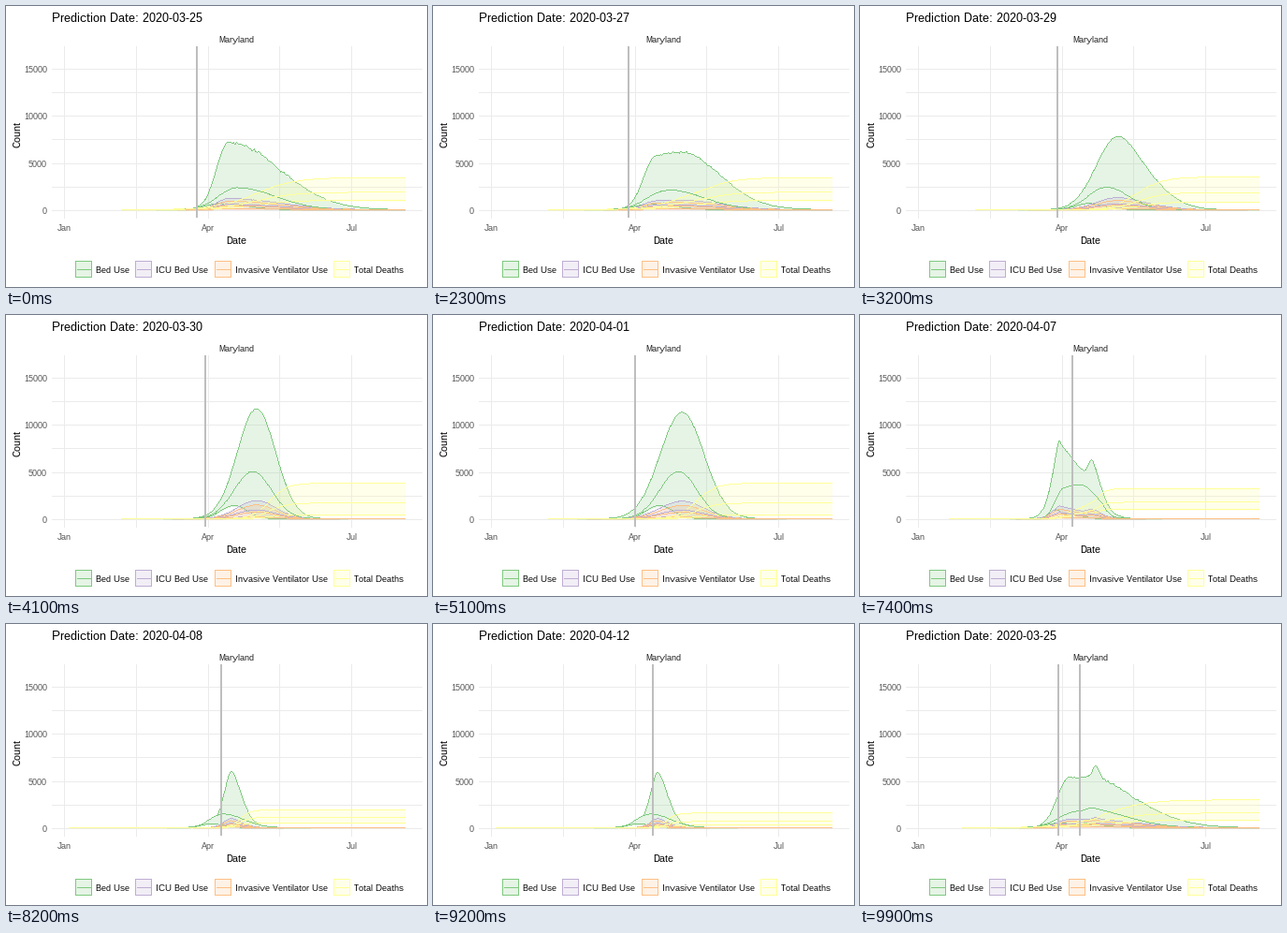
Recreate the animation shown at these times as a matplotlib script. Size 450x300 px, loop 10000 ms.

```python
import numpy as np
import matplotlib as mpl
import matplotlib.pyplot as plt
from matplotlib.animation import FuncAnimation
from matplotlib.patches import Polygon, Rectangle

W, H, DPI = 450, 300, 72
FRAMES, STEP, MOVE = 100, 100, 4
mpl.rcParams.update({
    "toolbar": "None",
    "font.family": "Liberation Sans",
    "text.hinting": "native",
    "text.hinting_factor": 1,
})

TOP, BOTTOM, LEFT, RIGHT = 43, 226, 49, 444
COLORS = ["#7FC97F", "#BEAED4", "#FDC086", "#FFFF99"]
GRID, RULE = "#EBEBEB", "#BEBEBE"
ALPHA = 0.2
LAST_DAY = 216
SHORT, LONG = 36, 3  # first day of a short and of a long record


def day_x(day):
    return 62.6 + 1.687 * day


def count_y(count):
    return 218.5 - count * 0.01009


def bump(x, h, c, left, right, p=2.0):
    """Peak of height h at c with its own width on either side."""
    return h * np.exp(-0.5 * (np.abs(x - c) / np.where(x < c, left, right)) ** p)


def rise(x, h, c, w):
    return h / (1 + np.exp(-np.clip((x - c) / w, -50, 50)))


def wobble(x, size):
    """Uneven factor around 1, one seeded value per day."""
    noise = np.random.default_rng(4).normal(0, size, LAST_DAY)
    return 1 + np.interp(x, day_x(np.arange(LAST_DAY)), noise)


class Forecast:
    def __init__(self, first, peak, mean, deaths, rough=0):
        self.first, self.peak, self.mean = first, peak, mean
        self.deaths, self.rough = deaths, rough

    def curves(self, days):
        """Upper, mean and lower curve of each of the four groups."""
        x = day_x(days)
        up = bump(x, *self.peak) * wobble(x, self.rough)
        h, c, left, right = self.mean
        mid = bump(x, *self.mean)
        low = bump(x, 0.28 * h, c - left, 0.7 * left, 0.7 * right)
        icu = [up * k for k in (0.165, 0.08, 0.02)]
        vent = [up * k for k in (0.125, 0.06, 0.015)]
        _, top, _, fall = self.peak[:4]
        dead = [rise(x, d, top + 5 + 0.45 * fall, 2 + 0.35 * fall)
                for d in self.deaths]
        return np.array([[np.maximum(up, mid), mid, np.minimum(low, mid)],
                         icu, vent, dead])


def middle(i):
    return Forecast(SHORT, (11700 - 250 * i, 268 - i, 20 + 2 * i, 20 + 2 * i),
                    (5000, 264 - i, 20, 20), (3750, 1650, 400))


def late(i):
    return Forecast(LONG, (6000 - 75 * i, 241 - i / 2, 7.6, 10.5, 1.7),
                    (1450, 232, 14, 22),
                    (2000 - 225 * i, 1250 - 300 * i, 630 - 190 * i))


early = Forecast(SHORT, (7100, 238, 13, 54), (2330, 247, 20, 41),
                 (3400, 1850, 1000), rough=0.015)
broad = Forecast(SHORT, (7000, 283, 25, 32), (1500, 262, 18, 30),
                 (3350, 1850, 950))
sharp = Forecast(SHORT, (16500, 241, 6.8, 9.5, 1.5), (6740, 247, 9.5, 9),
                 (4400, 2230, 1450))

DAYS = [84, 85, 86, 88, 89, 90, 91, 95, 97, 98, 100, 102]
MODELS = ([early] * 3 + [broad] + [middle(i) for i in range(3)]
          + [sharp] * 2 + [late(i) for i in range(3)])


def date(day):
    month, dom = (3, day - 59) if day < 91 else (4, day - 90)
    return f"2020-{month:02d}-{dom:02d}"


def phase(frame):
    """Current state, next state and progress between the two."""
    state = 0
    for i in range(len(DAYS)):
        after = (i + 1) % len(DAYS)
        step = frame - (5 + 8 * i + min(i, 4)) + 1
        if step >= MOVE:
            state = after
        elif step > 0:
            return i, after, step / MOVE
    return state, state, 0.0


def lag(days):
    """Days by which a long record trails its match in a short one."""
    return (SHORT - LONG) * np.clip((117 - days) / 10, 0, 1)


def blend(a, b, t):
    first = max(a.first, b.first)
    days = np.linspace(first, LAST_DAY, (LAST_DAY - first) * 4 + 1)
    da, db = (days - lag(days) if m.first < first else days for m in (a, b))
    ya, yb = a.curves(da), b.curves(db)
    return day_x(da + (db - da) * t), count_y(ya + (yb - ya) * t)


def pixels(x, y):
    """Whole pixels along a path, one per step of its longer direction."""
    step = np.maximum(np.abs(np.diff(x)), np.abs(np.diff(y)))
    length = np.r_[0, np.cumsum(step)]
    s = np.arange(0, length[-1], 0.95)
    return np.floor(np.interp(s, length, x)), np.floor(np.interp(s, length, y))


fig = plt.figure(figsize=(W / DPI, H / DPI), dpi=DPI, facecolor="white")
ax = fig.add_axes([0, 0, 1, 1])
ax.set_xlim(0, W)
ax.set_ylim(H, 0)
ax.axis("off")


def put(x, y, text, size=9, color="black", **kw):
    return ax.text(x, y, text, fontsize=size, color=color,
                   **{"va": "baseline", "ha": "left", **kw})


def stroke(xs, ys, color, z):
    ax.plot(xs, ys, color=color, lw=1, antialiased=False, zorder=z,
            solid_capstyle="butt", solid_joinstyle="miter")


def thin(color, z):
    return ax.plot([], [], ",", color=color, zorder=z)[0]


def area(color, z):
    return ax.add_patch(Polygon(
        np.zeros((3, 2)), closed=True, facecolor=color, edgecolor="none",
        alpha=ALPHA, antialiased=False, zorder=z))


def block(x, y, w, h, z, **kw):
    return ax.add_patch(Rectangle((x, y), w, h, antialiased=False,
                                  edgecolor="none", zorder=z, **kw))


# Grid and axes
for count in range(0, 17000, 2500):
    y = int(count_y(count))
    stroke([LEFT, RIGHT], [y, y], GRID, 1)
    if count % 5000 == 0:
        put(44, y + 4, str(count), color="#4D4D4D", ha="right")
for i, month in enumerate(["Jan", "", "Apr", "", "Jul"]):
    x = day_x(45.5 * i)
    stroke([int(x)] * 2, [TOP, BOTTOM], GRID, 1)
    put(x, 240, month, color="#4D4D4D", ha="center")
put(246, 39, "Maryland", color="#1A1A1A", ha="center")
put(246, 254, "Date", 11, ha="center")
put(12, 137, "Count", 11, rotation=90, ha="center", va="center")
title = put(49, 17, "", 13)

# Legend
LABELS = {"Bed Use": 74, "ICU Bed Use": 138,
          "Invasive Ventilator Use": 223, "Total Deaths": 350}
KEY, KEY_Y = 17, 272
for (label, x), color in zip(LABELS.items(), COLORS):
    r, b = x + KEY, KEY_Y + KEY
    block(x, KEY_Y, KEY, KEY, 2, facecolor=color, alpha=ALPHA)
    stroke([x, r, r, x, x], [KEY_Y, KEY_Y, b, b, KEY_Y], color, 3)
    stroke([x + 2, r - 1], [KEY_Y + 9] * 2, color, 3)
    put(x + 22, 285, label)

# Moving parts
areas = [area(c, 3 + i * 0.2) for i, c in enumerate(COLORS)]
uppers, lowers = [[thin(c, 3.1 + i * 0.2) for i, c in enumerate(COLORS)]
                  for _ in range(2)]
means = [thin(c, 4 + i * 0.1) for i, c in enumerate(COLORS)]
rule, old_rule = [block(0, TOP, 2, BOTTOM - TOP, 5, facecolor=RULE)
                  for _ in range(2)]


def update(frame):
    a, b, t = phase(frame)
    title.set_text("Prediction Date: " + date(DAYS[b if t > 0.5 else a]))
    day = DAYS[a] + (DAYS[b] - DAYS[a]) * t
    rule.set_x(round(day_x(day)) - 1)
    # A long record leaves its rule behind until the move is over.
    old_rule.set_x(round(day_x(DAYS[a])) - 1)
    old_rule.set_visible(MODELS[a].first < MODELS[b].first)

    x, groups = blend(MODELS[a], MODELS[b], t)
    for i, (up, mid, low) in enumerate(groups):
        areas[i].set_xy(np.column_stack([np.r_[x, x[::-1]],
                                         np.r_[up, low[::-1]]]))
        for line, y in ((uppers[i], up), (means[i], mid), (lowers[i], low)):
            line.set_data(*pixels(x, y))
    return [*areas, *uppers, *lowers, *means, rule, old_rule, title]


anim = FuncAnimation(fig, update, frames=FRAMES, interval=STEP,
                     init_func=lambda: update(0), repeat=True,
                     repeat_delay=0, blit=False)
plt.show()
```
